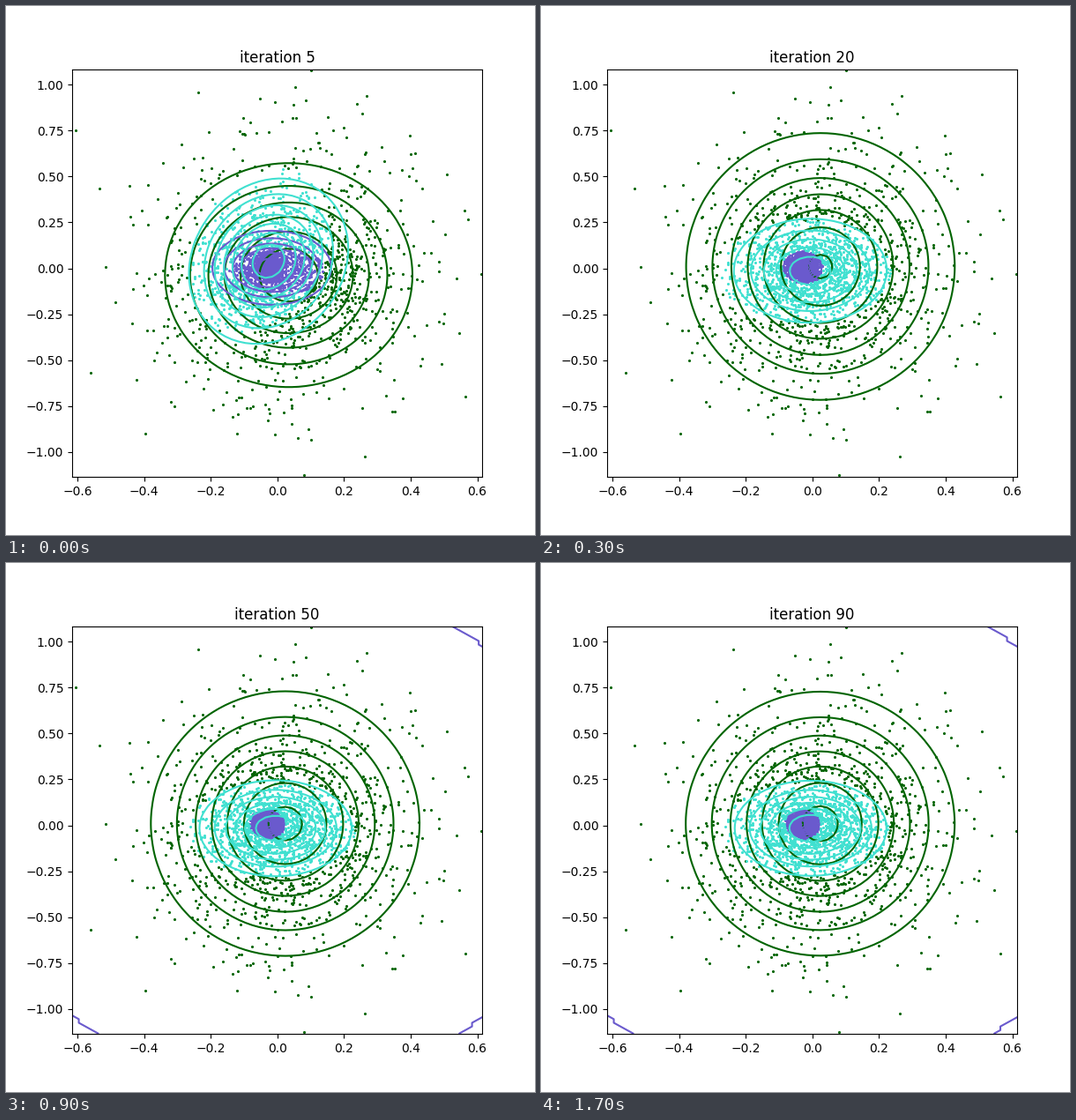
A matplotlib script that plays this animation: 600x600 px, repeating every 1.8 s.

```python
import numpy as np
import matplotlib.pyplot as plt
from matplotlib.animation import FuncAnimation

FRAMES, INTERVAL = 18, 100
XLIM, YLIM = (-0.6159, 0.6143), (-1.1358, 1.0832)
STEP = 0.02  # grid spacing of the contours


class Cluster:
    """A Gaussian (mean x, mean y, sigma x, sigma y, correlation) that settles.

    swing adds an overshoot that dies out with tau, drift a slow remainder.
    """

    def __init__(self, color, weight, tau, start, end, swing=0, drift=0):
        self.color, self.weight, self.tau = color, weight, tau
        self.start, self.end, self.swing, self.drift = map(
            np.asarray, (start, end, swing, drift))

    def at(self, t):
        fast = self.start - self.end - self.drift + self.swing * t
        return (self.end + self.drift * np.exp(-t / 20)
                + fast * np.exp(-t / self.tau))

    def sample(self, rng, count, reach=4):
        """Random points of the settled shape, at most reach sigmas out."""
        pts = rng.normal(size=(count, 2))
        pts = pts[np.hypot(*pts.T) < reach]
        return pts * self.end[2:4] + self.end[:2]


outer = Cluster("darkgreen", 1.0, 3,
                start=(0.034, -0.037, 0.1905, 0.313, 0),
                end=(0.0235, 0.009, 0.2026, 0.361, 0),
                swing=(0.0058, -0.006, 0.0085, 0.0034, 0),
                drift=(0, 0.004, 0, 0.0124, 0))
core = Cluster("slateblue", 0.6, 5,
               start=(-0.017, 0.003, 0.0908, 0.103, 0),
               end=(-0.029, 0.006, 0.0237, 0.0360, -0.042),
               swing=(0, 0, 0.001, 0.001, 0))
middle = Cluster("turquoise", 1.0, 5,
                 start=(-0.0264, 0.039, 0.1183, 0.2235, 0.15),
                 end=(-0.0053, -0.016, 0.115, 0.131, 0),
                 swing=(0, 0, 0.0035, 0.0105, 0),
                 drift=(0, 0, 0.0124, 0.02, 0))
CLUSTERS = [outer, core, middle]

# The few outermost points
FAR = [(-0.606, 0.75), (0.1, 1.08), (0.08, -1.126), (0.611, -0.03),
       (-0.237, 0.96), (0.267, 0.938), (-0.533, 0.437), (-0.56, -0.57),
       (0.564, -0.70), (-0.396, -0.90), (0.262, -1.025), (0.508, 0.51)]


def density(x, y, mx, my, sx, sy, rho):
    u, v = (x - mx) / sx, (y - my) / sy
    q = (u * u - 2 * rho * u * v + v * v) / (1 - rho**2)
    norm = 2 * np.pi * sx * sy * np.sqrt(1 - rho**2)
    return np.exp(-q / 2 - np.log(norm))


rng = np.random.default_rng(7)
px, py = np.vstack([outer.sample(rng, 1000, reach=2.8), FAR,
                    middle.sample(rng, 1000), core.sample(rng, 1000)]).T
gx, gy = np.meshgrid(*(np.arange(lo, hi + STEP, STEP) for lo, hi in (XLIM, YLIM)))
fig, ax = plt.subplots(figsize=(6, 6), dpi=100)


def draw(frame):
    fits = [c.at(5 * frame) for c in CLUSTERS]
    scores = [c.weight * density(px, py, *fit) for c, fit in zip(CLUSTERS, fits)]
    owner = np.argmax(scores, axis=0)

    ax.clear()
    for k, (c, fit) in enumerate(zip(CLUSTERS, fits)):
        mine = owner == k
        ax.scatter(px[mine], py[mine], s=5, color=c.color, linewidths=0)
        ax.contour(gx, gy, density(gx, gy, *fit), colors=c.color)
    ax.set(xlim=XLIM, ylim=YLIM, title=f"iteration {5 * (frame + 1)}")
    return []


anim = FuncAnimation(fig, draw, frames=FRAMES, interval=INTERVAL,
                     init_func=lambda: [], repeat=True, repeat_delay=0)
plt.show()
```
